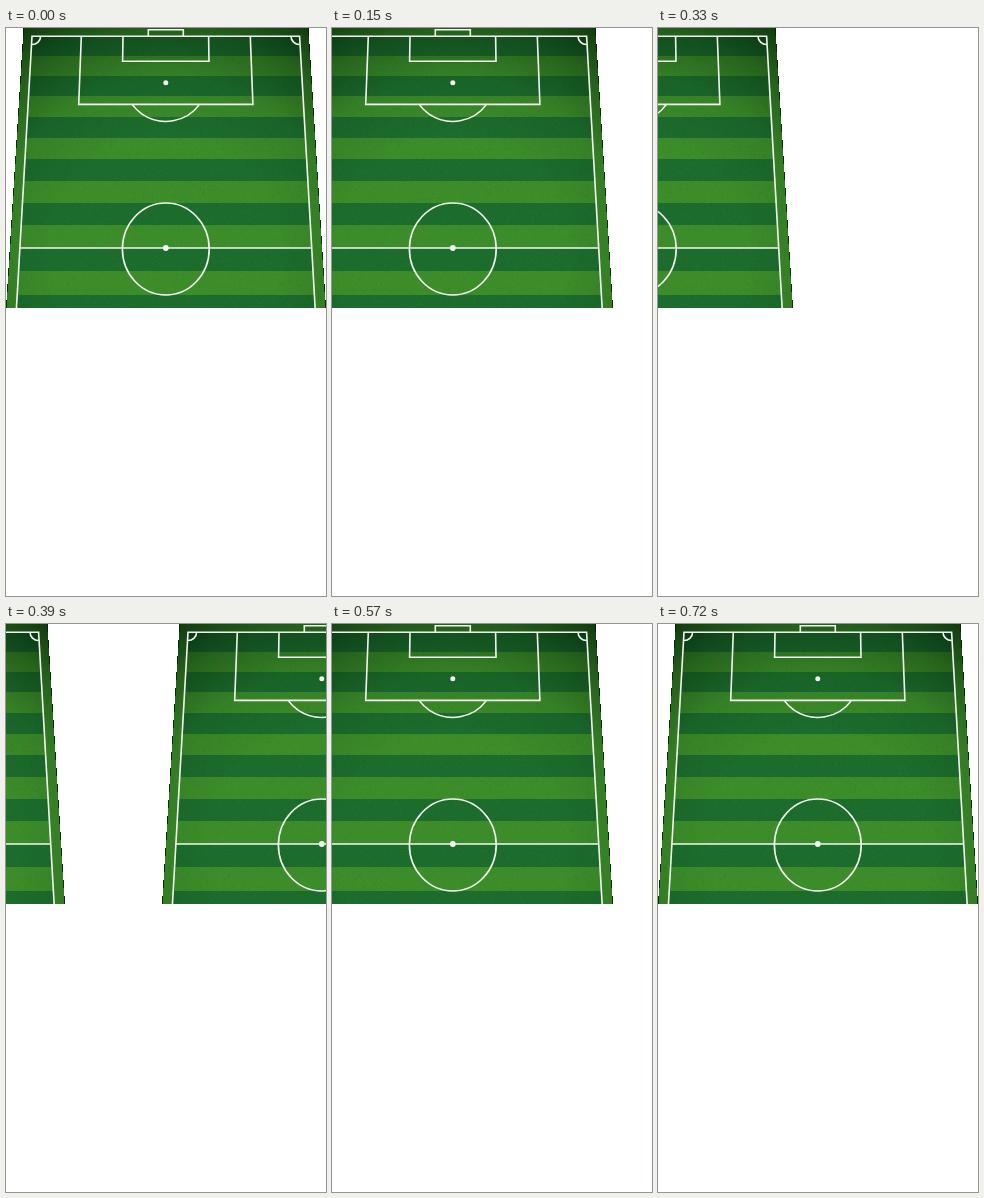
Recreate the animation shown at these times as an HTML page with a canvas. Size 320 by 568 pixels, loop 750 ms.

```html
<!DOCTYPE html>
<html lang="en">
<head>
<meta charset="utf-8">
<title>Sliding pitch</title>
<style>
html, body { margin: 0; width: 100%; height: 100%; overflow: hidden; background: #fff; }
canvas { display: block; width: 320px; height: 568px; }
</style>
</head>
<body>
<canvas id="stage" width="320" height="568"></canvas>
<script>
const ctx = document.getElementById('stage').getContext('2d');
const STEP = 30, LOOP = 750;
const WIDTH = 320, HEIGHT = 280;
const CX = 159.8, GOAL_LINE = 8.3, HALFWAY = 220;
const TOP_HALF = 133.8, BOTTOM_HALF = 149.4;

// Three joined lines, mirrored about the middle of the pitch.
function bracket(c, half0, y0, half1, y1) {
  c.beginPath();
  c.moveTo(CX - half0, y0);
  c.lineTo(CX - half1, y1);
  c.lineTo(CX + half1, y1);
  c.lineTo(CX + half0, y0);
}

function dot(c, x, y, r) {
  c.beginPath();
  c.arc(x, y, r, 0, Math.PI * 2);
  c.fill();
}

function arc(c, x, y, rx, ry, from, to) {
  c.beginPath();
  c.ellipse(x, y, rx, ry, 0, from, to);
  c.stroke();
}

// Stripes widen steadily towards the viewer.
const stripeEdge = i => Math.round(8 + 19.42 * i + 0.18 * i * i);

function drawGrass(c) {
  c.fillStyle = '#3a8829';
  c.fillRect(0, 0, WIDTH, HEIGHT);

  c.save();
  bracket(c, BOTTOM_HALF, HEIGHT, TOP_HALF, GOAL_LINE);
  c.clip();
  for (let i = 0; stripeEdge(i) < HEIGHT; i++) {
    c.fillStyle = i % 2 ? '#3c8d2a' : '#1c6d2d';
    c.fillRect(0, stripeEdge(i), WIDTH, stripeEdge(i + 1) - stripeEdge(i));
  }
  c.restore();

  let seed = 7;
  const random = () => (seed = (seed * 16807) % 2147483647) / 2147483647;
  for (let i = 0; i < 9000; i++) {
    c.fillStyle = random() < 0.5 ? 'rgba(0,30,0,.07)' : 'rgba(130,190,60,.06)';
    c.fillRect(Math.floor(random() * WIDTH), Math.floor(random() * HEIGHT), 1, 1);
  }

  const shade = c.createRadialGradient(160, 224, 110, 160, 224, 270);
  shade.addColorStop(0, 'rgba(0,25,5,0)');
  shade.addColorStop(0.4, 'rgba(0,25,5,.11)');
  shade.addColorStop(0.7, 'rgba(0,25,5,.36)');
  shade.addColorStop(1, 'rgba(0,25,5,.72)');
  c.fillStyle = shade;
  c.fillRect(0, 0, WIDTH, HEIGHT);
}

function drawMarkings(c) {
  c.strokeStyle = c.fillStyle = '#f2f8f0';
  c.lineWidth = 1.6;
  const outlines = [
    [BOTTOM_HALF, HEIGHT + 1, TOP_HALF, GOAL_LINE],
    [17.5, GOAL_LINE, 17.5, 1.8],
    [42.8, GOAL_LINE, 43.2, 33.3],
    [84.5, GOAL_LINE, 87.1, 76.4],
    [146, HALFWAY, 146, HALFWAY]
  ];
  for (const outline of outlines) {
    bracket(c, ...outline);
    c.stroke();
  }

  const reach = Math.asin((76.4 - 53.9) / 39.5);
  arc(c, CX, 53.9, 41, 39.5, reach, Math.PI - reach);
  arc(c, CX, 221, 43.4, 46, 0, Math.PI * 2);
  arc(c, CX - TOP_HALF, GOAL_LINE, 8.6, 8.2, 0, Math.PI / 2);
  arc(c, CX + TOP_HALF, GOAL_LINE, 8.6, 8.2, Math.PI / 2, Math.PI);
  dot(c, CX, 54.8, 2.5);
  dot(c, CX, HALFWAY, 2.9);
}

// Cuts the slanted sides to whole pixels; partly covered ones stay as a dark rim.
function trimSides(c) {
  c.fillStyle = 'rgba(0,35,8,.85)';
  for (let y = 0; y < HEIGHT; y++) {
    const inset = 17.5 * (1 - (y + 0.5) / HEIGHT);
    const cut = Math.round(inset);
    c.clearRect(0, y, cut, 1);
    c.clearRect(WIDTH - cut, y, cut, 1);
    if (inset > cut) {
      c.fillRect(cut, y, 1, 1);
      c.fillRect(WIDTH - cut - 1, y, 1, 1);
    }
  }
}

function makePitch() {
  const canvas = document.createElement('canvas');
  canvas.width = WIDTH;
  canvas.height = HEIGHT;
  const c = canvas.getContext('2d');
  drawGrass(c);
  drawMarkings(c);
  trimSides(c);
  return canvas;
}

// Positions are functions of n, the count of elapsed steps.
const leavingX = n => -n * (1.6 + n * (1.159 + n * 0.0202));

// Overshoots to the left, then settles in the middle.
function arrivingX(n) {
  const peak = -41.5;
  if (n < 18) return peak + 7.88 * (18 - n) ** 2;
  return peak * (1 - Math.min(1, (n - 18) / 6) ** 1.57);
}

const pitch = makePitch();

function render(now) {
  const n = Math.floor((now % LOOP) / STEP);
  ctx.fillStyle = '#fff';
  ctx.fillRect(0, 0, 320, 568);
  if (n < 15) ctx.drawImage(pitch, Math.round(leavingX(n)), 0);
  if (n > 10) ctx.drawImage(pitch, Math.round(arrivingX(n)), 0);
}

const start = performance.now();
function tick() {
  render(performance.now() - start);
  requestAnimationFrame(tick);
}
tick();
</script>
</body>
</html>
```
